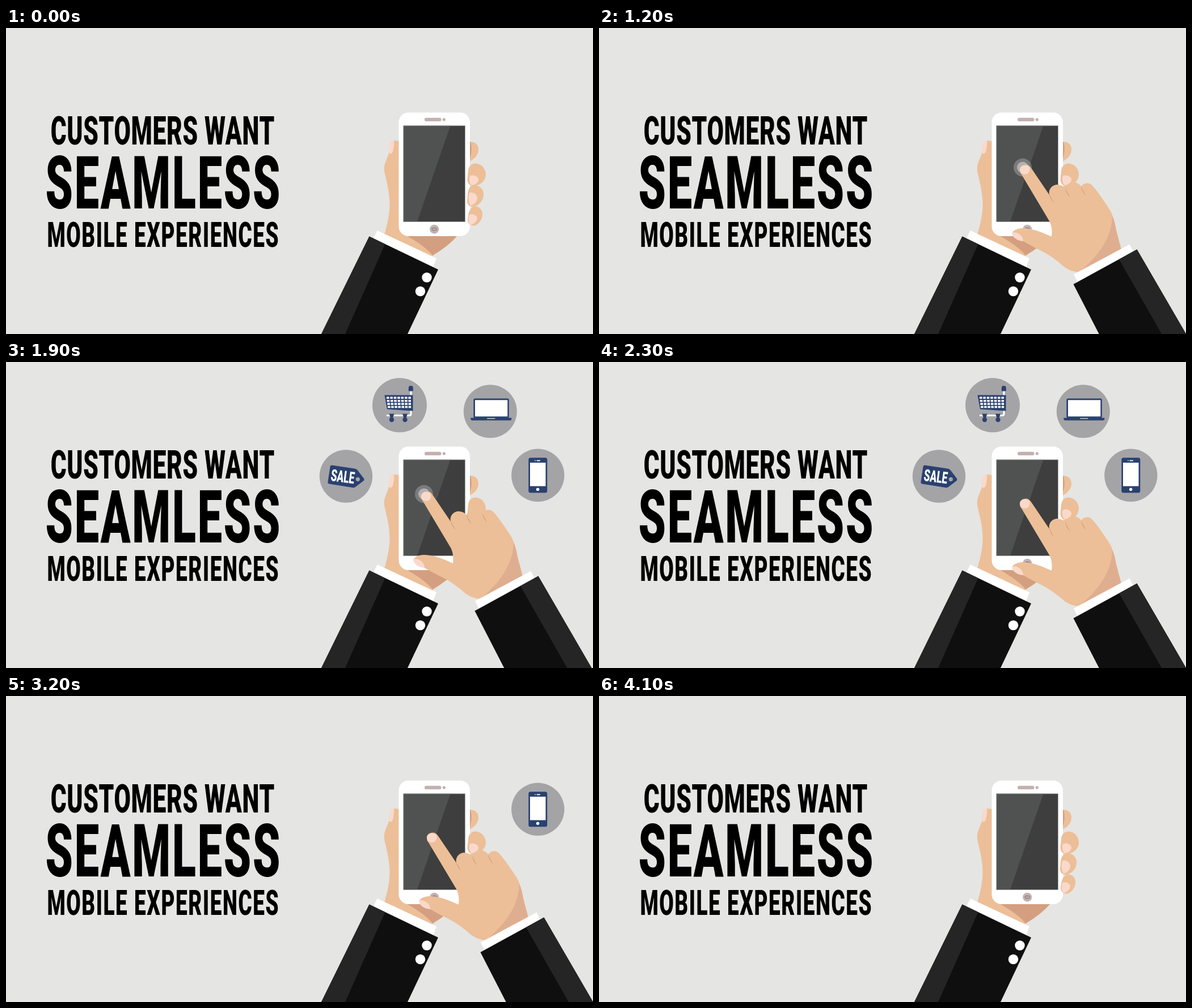
Recreate the animation shown at these times as an HTML page with a canvas. Size 1035x541 px, loop 4200 ms.

```html
<!DOCTYPE html>
<html lang="en">
<head>
<meta charset="utf-8">
<title>Customers want seamless mobile experiences</title>
<style>
html, body { margin: 0; width: 100%; height: 100%; overflow: hidden; background: #e5e5e3; }
canvas { display: block; }
</style>
</head>
<body>
<canvas id="stage" width="1035" height="541"></canvas>
<script>
const ctx = document.getElementById('stage').getContext('2d');
const LOOP = 4200, STEP = 100, CONDENSED = 0.6;
const SKIN = '#ecbf98', SHADE = '#d49f80', NAIL = '#fad9cb', WHITE = '#fff';
const SUIT = '#0f0f0f', SUIT_LIGHT = '#252525', NAVY = '#2a4170', GREY = '#a4a4a7', MAUVE = '#c3b1b1';

function shape(d, color) {
  ctx.fillStyle = color;
  ctx.fill(new Path2D(d));
}

function disc(x, y, r, color) {
  ctx.fillStyle = color;
  ctx.beginPath();
  ctx.arc(x, y, r, 0, Math.PI * 2);
  ctx.fill();
}

function box(x, y, w, h, r, color) {
  ctx.fillStyle = color;
  ctx.beginPath();
  ctx.roundRect(x, y, w, h, r);
  ctx.fill();
}

// Heavy condensed capitals, centred on x, with tracking in em.
function caps(text, x, y, size, color, tracking = 0, angle = 0) {
  ctx.save();
  ctx.translate(x, y);
  ctx.rotate(angle);
  ctx.scale(CONDENSED, 1);
  ctx.font = `900 ${size}px Roboto, "Liberation Sans", sans-serif`;
  ctx.letterSpacing = `${tracking * size}px`;
  ctx.textAlign = 'center';
  ctx.fillStyle = color;
  ctx.fillText(text, tracking * size / 2, 0);
  ctx.restore();
}

function headline() {
  caps('CUSTOMERS WANT', 276, 206, 71, '#000', 0.015);
  caps('SEAMLESS', 276.5, 318.5, 129, '#000', 0.036);
  caps('MOBILE EXPERIENCES', 276.5, 387, 61.5, '#000', 0.043);
}

function phone() {
  box(692.5, 149.5, 125.5, 218.5, 17, WHITE);
  box(738, 158.7, 29.5, 6.3, 3.1, MAUVE);
  disc(772.3, 161.9, 2.6, MAUVE);
  ctx.fillStyle = '#3e3e3e';
  ctx.fillRect(700.8, 172.8, 108.6, 169.8);
  shape('M700.8 172.8H783.5L725 342.6H700.8Z', '#505251');
  ctx.strokeStyle = '#a0a0a0';
  ctx.lineWidth = 0.8;
  ctx.strokeRect(700.8, 172.8, 108.6, 169.8);
  disc(755.2, 355.7, 8, MAUVE);
  ctx.strokeStyle = '#75686a';
  ctx.lineWidth = 1;
  ctx.beginPath();
  ctx.roundRect(751.3, 353.6, 7.8, 4.2, 1.6);
  ctx.stroke();
}

function holdingHand() {
  shape('M694 200L685 199Q680 198 677 210L675 222Q671 232 668 240Q665 248 669 262Q676 290 676.5 310Q677 330 668 362L664 372L750 412L753 402L796 367L780 340L700 320Z', SKIN);
  shape('M700 364Q735 382 752.5 402Q780 386 797 366L780 350L715 355Z', SHADE);
  shape('M684 199C679 198 676 203 675 212Q674 222 678 222.5Q682 222 683 214Q685 206 684 199Z', NAIL);
  shape('M654.5 358L759 407L753 424L647 374Z', WHITE);
  shape('M640.5 368.5L762 427L708 541H556Z', SUIT);
  shape('M640.5 368.5L668.5 382L598 541H556Z', SUIT_LIGHT);
  disc(742, 441, 8.7, WHITE);
  disc(730.5, 465.5, 8.7, WHITE);
  shape('M816 201C828 200 833 207 833 215C833 224 827 231 816 237Z', SKIN);
  shape('M816 201H819Q824 217 816 236Z', SHADE);
  phone();
  shape('M815 252C816 243 823 238 831 240C841 242 846 251 846 260C845 270 838 277 828 278.5C819 280 814 277 813.5 268Z', SKIN);
  shape('M814 293C815 282 821 276 829 278C838 280 843 288 842 296C841 306 834 313 826 315.5C818 317 813 313 813 306Z', SKIN);
  shape('M815 331C817 320 823 314 829 315.5C837 317 841 324 840 331C839 340 833 347 826 349.5C818 350 814 346 814 339Z', SKIN);
  shape('M818 261.5C824 259 832 262 833 267.5C833 273 828 277 821 278C817 275 816 267 818 261.5Z', NAIL);
  shape('M817 291.5C823 289 830 294 831 300C831 307 826 312 819 314C815 308 815 298 817 291.5Z', NAIL);
  shape('M817 330C823 328 829 331 831 335C831 341 826 347 818 348.5C815 344 815 336 817 330Z', NAIL);
}

function tappingHand(dx, dy, ripple) {
  ctx.save();
  ctx.translate(dx, dy);
  if (ripple) {
    disc(747, 246.5, 16 * ripple, 'rgba(255,255,255,.24)');
    disc(747, 246.5, 10 * ripple, 'rgba(255,255,255,.42)');
  }
  shape('M742 252C741 244 749 240 756 242Q760 244 763 249L794 295C792 284 800 277 808 277Q816 277 822 283C826 274 834 271 840 273Q847 275 850 280C856 273 864 273 868 277C876 284 892 308 901 322Q907 333 910 350L922 396L850 440L846 432Q833 431 821 423Q800 404 780 394Q760 384 748 377Q733 374 728.5 363Q730 356 745 354Q765 353 798 369Q800 355 795 343L745 259Q742 256 742 252Z', SKIN);
  shape('M905 332Q910 343 912 358L922 396L850 440L846 432C880 404 904 372 905 332Z', '#dfae90');
  for (const [x, y] of [[794, 293], [822, 282.5], [850, 280]]) {
    shape(`M${x} ${y}Q${x + 1} ${y + 10} ${x + 9} ${y + 17}Q${x + 3} ${y + 8} ${x} ${y}Z`, SHADE);
  }
  shape('M742 251C742 244 750 241 757 244C761 248 760 255 755 258C749 260 743 258 742 251Z', NAIL);
  shape('M729 361.5Q736 360 742 365Q748 370 748 377Q738 376 732 370.5Q727 365 729 361.5Z', NAIL);
  shape('M837 435.5L935.5 382.5L942 395L845 452Z', WHITE);
  shape('M836.5 453L948.5 391.5L1093 641H933Z', SUIT);
  shape('M917 409L948.5 391.5L1093 641H1049Z', SUIT_LIGHT);
  ctx.restore();
}

function mobileIcon() {
  disc(937.8, 200.3, 46.7, GREY);
  box(921.3, 169.3, 33, 62, 3.5, NAVY);
  ctx.fillStyle = WHITE;
  ctx.fillRect(924, 178, 27.5, 41.5);
  box(935.5, 173.6, 6.5, 1.6, 0.8, WHITE);
  disc(933, 174.4, 0.8, WHITE);
  disc(937.6, 225.3, 2.7, WHITE);
}

function laptopIcon() {
  disc(853.8, 87.3, 47, GREY);
  box(824.3, 64.5, 62.5, 35, 3, NAVY);
  ctx.fillStyle = WHITE;
  ctx.fillRect(827, 67.3, 57.3, 29);
  box(819.3, 98.7, 72, 4.6, [0.5, 0.5, 3, 3], NAVY);
  box(848, 99, 14.5, 1.7, 0.8, '#b4b6c0');
}

function cartIcon() {
  disc(694, 76.3, 48, GREY);
  ctx.strokeStyle = WHITE;
  ctx.lineWidth = 3;
  ctx.lineJoin = 'round';
  ctx.stroke(new Path2D('M714 49V92Q714 94.5 711 94.5H671'));
  box(709.8, 42, 8, 9.5, [4, 4, 1, 1], NAVY);
  shape('M667.5 58.5H717.5V86.5L672 83.5Z', NAVY);
  for (let row = 0; row < 4; row++) {
    for (let col = 0; col < 7; col++) {
      box(671 + row * 0.7 + col * (6.4 - row * 0.1), 61.5 + row * 5.4, 4.5, 3.6, 0.3, WHITE);
    }
  }
  for (const x of [680, 703.5]) {
    shape(`M${x - 4.5} 91.5H${x + 4.5}L${x + 2} 99H${x - 2}Z`, NAVY);
    disc(x, 102, 4.2, NAVY);
  }
}

function saleIcon() {
  disc(599.5, 202, 46.7, GREY);
  shape('M575 182.5L615 188.5Q618 189 620 191.5L631 206Q632.5 208 630.5 210L616 221Q614 222.5 611 222L570 215.5Q567 215 567.5 212L571.5 185Q572 182 575 182.5Z', NAVY);
  disc(620.3, 207.3, 3.6, GREY);
  caps('SALE', 592.5, 212.5, 29, WHITE, 0, 0.13);
}

const icons = [
  { draw: mobileIcon, from: 1600, to: 3300 },
  { draw: laptopIcon, from: 1700, to: 3000 },
  { draw: cartIcon, from: 1800, to: 2700 },
  { draw: saleIcon, from: 1900, to: 2400 }
];

// Finger positions during the swipe, one per step from 1500 ms.
const swipe = [[22, 1], [38, -6], [36, -18], [14, -23], [-10, -13], [-20, 3], [-10, 0], [-10, 0]];

function handOffset(t) {
  if (t < 800) return [61 + (700 - t) * 0.568, 0];
  if (t >= 3500) return [5 + (t - 3500) * 0.568, 0];
  return swipe[(t - 1500) / STEP] || [0, 0];
}

function rippleSize(t) {
  return t >= 1000 && t < 2100 ? Math.min(1, (t - 900) / 300) : 0;
}

function frame() {
  const t = Math.floor((performance.now() % LOOP) / STEP) * STEP;
  ctx.fillStyle = '#e5e5e3';
  ctx.fillRect(0, 0, 1035, 541);
  headline();
  for (const icon of icons) if (t >= icon.from && t < icon.to) icon.draw();
  holdingHand();
  if (t >= 300 && t < 4100) tappingHand(...handOffset(t), rippleSize(t));
  requestAnimationFrame(frame);
}
frame();
</script>
</body>
</html>
```
